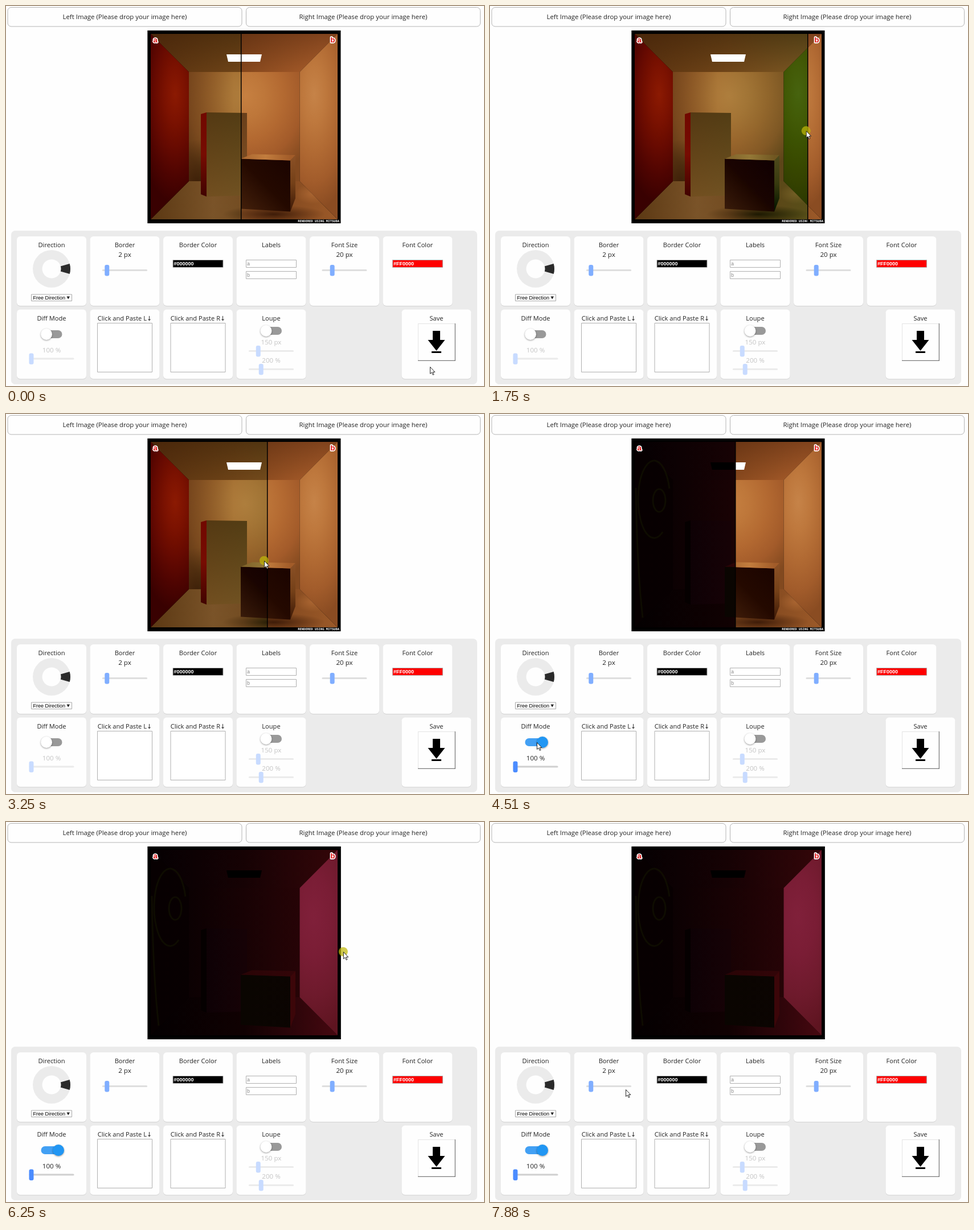
An HTML page with a canvas for the animation above (8000 ms loop, 839x668 px).

```html
<!DOCTYPE html>
<html lang="en">
<head>
<meta charset="utf-8">
<title>Image comparison</title>
<style>
html, body { margin: 0; width: 100%; height: 100%; overflow: hidden; background: #fefefe; }
canvas { display: block; }
</style>
</head>
<body>
<canvas id="stage" width="839" height="668"></canvas>
<script>
const W = 839, H = 668, LOOP = 8000, STEP = 125;
const VIEW = { x: 248.5, y: 43, s: 339 };
const UI = '"Open Sans", "Noto Sans", "DejaVu Sans", sans-serif';
const FORM = '"Liberation Sans", Arial, sans-serif';
const stage = document.getElementById('stage').getContext('2d');

function layer(paint) {
  const c = document.createElement('canvas');
  c.width = W;
  c.height = H;
  paint(c.getContext('2d'));
  return c;
}

function trace(g, points) {
  g.beginPath();
  for (const [x, y] of points) g.lineTo(x, y);
  g.closePath();
}

function poly(g, points, fill) {
  trace(g, points);
  g.fillStyle = fill;
  g.fill();
}

function stops(grad, colors) {
  colors.forEach((c, i) => grad.addColorStop(i / (colors.length - 1), c));
  return grad;
}

// Gradient running along a line between two points
const blend = (g, [x0, y0], [x1, y1], ...colors) =>
  stops(g.createLinearGradient(x0, y0, x1, y1), colors);

// Elliptical light, clipped to a wall
function glow(g, points, [x, y], rx, ry, ...colors) {
  g.save();
  trace(g, points);
  g.clip();
  g.translate(x, y);
  g.scale(rx, ry);
  g.fillStyle = stops(g.createRadialGradient(0, 0, 0, 0, 0, 1), colors);
  g.fillRect(-9, -9, 18, 18);
  g.restore();
}

function round(g, x, y, w, h, r, fill, stroke) {
  g.beginPath();
  g.roundRect(x, y, w, h, r);
  if (fill) { g.fillStyle = fill; g.fill(); }
  if (stroke) { g.strokeStyle = stroke; g.lineWidth = 1; g.stroke(); }
}

function disc(g, x, y, r, fill) {
  g.beginPath();
  g.arc(x, y, r, 0, Math.PI * 2);
  g.fillStyle = fill;
  g.fill();
}

function text(g, str, x, y, size = 11.1, color = '#222', align = 'center', font = UI, weight = '') {
  g.font = `${weight} ${size}px ${font}`;
  g.textAlign = align;
  g.fillStyle = color;
  g.fillText(str, x, y);
}

// Room: four walls join the open front to the back wall
const corners = (l, t, r, b) => [[l, t], [r, t], [r, b], [l, b]];
const FRONT = corners(254, 49, 582, 375);
const BACK = corners(321, 116, 515.5, 308);
const [CEILING, RIGHT, FLOOR, LEFT] = FRONT.map((p, i) => {
  const j = (i + 1) % 4;
  return [p, FRONT[j], BACK[j], BACK[i]];
});
const LIGHT = [[387, 85], [449, 85], [446, 98], [390, 98]];
const drop = (a, b, ha, hb) => [a, b, [b[0], b[1] + hb], [a[0], a[1] + ha]];
const TALL = drop([352, 187], [423, 188], 148, 145);
const TALL_SIDE = drop([342, 190], [352, 187], 141, 148);
const CUBE = drop([412, 268.5], [499, 271.5], 88, 90);
const CUBE_SIDE = drop([499, 271.5], [508, 262], 90, 76);
const CUBE_TOP = [CUBE[0], [432, 260.5], CUBE_SIDE[1], CUBE[1]];

function backdrop(g) {
  g.fillStyle = '#000';
  g.fillRect(VIEW.x, VIEW.y, VIEW.s, VIEW.s);
}

const render = layer(g => {
  backdrop(g);
  poly(g, CEILING, blend(g, FRONT[0], [540, 116], '#5a2f10', '#7e431a', '#a45a29'));
  poly(g, CEILING, blend(g, FRONT[0], [254, 116], 'rgba(60,24,6,.35)', 'rgba(60,24,6,0)'));
  poly(g, FLOOR, blend(g, FRONT[3], FRONT[2], '#5f3814', '#86542a', '#80471e', '#9c5a29'));
  glow(g, BACK, [420, 158], 135, 155, '#c68041', '#be773a', '#b36931', '#a35b2a', '#82491f');
  poly(g, BACK, blend(g, BACK[0], [400, 116], 'rgba(80,40,14,.4)', 'rgba(80,40,14,0)'));
  glow(g, BACK, [335, 310], 55, 75, 'rgba(62,24,6,.75)', 'rgba(62,24,6,0)');
  glow(g, LEFT, [297, 155], 72, 190, '#931a03', '#831202', '#6e0a00', '#560400', '#400100');
  glow(g, RIGHT, [541, 155], 80, 205, '#c68348', '#be783d', '#b16a33', '#a25c2b', '#8a4c22');
  glow(g, FLOOR, [470, 366], 90, 16, 'rgba(45,17,3,.8)', 'rgba(60,25,5,0)');
  glow(g, FLOOR, [538, 330], 30, 18, 'rgba(195,120,62,.5)', 'rgba(195,120,62,0)');
  poly(g, LIGHT, '#fff');
  poly(g, TALL_SIDE, blend(g, TALL_SIDE[0], TALL_SIDE[3], '#760800', '#7c0c02', '#480300'));
  poly(g, TALL, blend(g, TALL[0], TALL[2], '#623a18', '#74471f', '#865428'));
  poly(g, CUBE, blend(g, CUBE[1], CUBE[3], '#1b0400', '#240900', '#43200b'));
  poly(g, CUBE_TOP, blend(g, CUBE[0], CUBE[1], '#a8652f', '#c27d3e', '#a25c29'));
  poly(g, CUBE_SIDE, blend(g, CUBE_SIDE[1], CUBE_SIDE[3], '#8c5126', '#744018', '#3c1806'));
  text(g, 'RENDERED USING MITSUBA', 585, 379.5, 5.5, '#fff', 'right', '"DejaVu Sans Mono", monospace', 'bold');
});

const diff = layer(g => {
  const fade = (wall, ...colors) => poly(g, wall, blend(g, FRONT[0], FRONT[1], ...colors));
  backdrop(g);
  fade(CEILING, '#050002', '#160204', '#340609');
  fade(FLOOR, '#040001', '#100102', '#460810');
  fade(BACK, '#030001', '#180204', '#300508');
  fade(LEFT, '#070001', '#0a0001');
  glow(g, RIGHT, [540, 165], 95, 210, '#80203a', '#7a1d35', '#6e1a2c', '#5e1420');
  poly(g, LIGHT, '#000');
  poly(g, TALL_SIDE, '#050000');
  fade(TALL, '#020004', '#160206', '#180205');
  fade(CUBE, '#060401', '#0a0501', '#0c0402');
  fade(CUBE_TOP, '#100102', '#2a0406', '#3a060a');
  poly(g, CUBE_SIDE, '#3c0609');
});

// The left picture is the render minus the difference
const left = layer(g => {
  g.drawImage(render, 0, 0);
  g.globalCompositeOperation = 'difference';
  g.drawImage(diff, 0, 0);
});

// Faint contour lines show only in the difference
const contours = layer(g => {
  g.drawImage(diff, 0, 0);
  g.lineWidth = 3;
  g.strokeStyle = 'rgba(32,42,0,.3)';
  g.beginPath();
  g.ellipse(288, 150, 28, 68, 0, 1, 6);
  g.moveTo(256, 130);
  g.quadraticCurveTo(258, 270, 268, 358);
  g.moveTo(308, 152);
  g.ellipse(297, 152, 11, 20, 0, 0, 7);
  g.stroke();
});

function slider(g, cx, y, part, on, soft) {
  round(g, cx - 39.5, y - 1.5, 79, 3, 1.5, on ? (soft ? '#dedede' : '#cfcfcf') : '#ebebeb');
  round(g, cx - 39.5 + part * 71, y - 9.5, 8, 19.5, 3, on ? (soft ? '#80aeff' : '#4b8cff') : '#c8dbff');
}

function toggle(g, cx, y, on) {
  round(g, cx - 18.5, y - 7, 37, 14, 7, on ? '#42a0f4' : '#999');
  g.save();
  g.shadowColor = 'rgba(0,0,0,.4)';
  g.shadowBlur = 3;
  g.shadowOffsetY = 1;
  disc(g, on ? cx + 12 : cx - 9, y, 10, on ? '#2196f3' : '#fff');
  g.restore();
}

function field(g, cx, y, str, fill = '#fff', color = '#8a8a8a', weight = '') {
  round(g, cx - 44, y, 88, 13, 0, fill, '#b0b0b0');
  text(g, str, cx - 42.5, y + 9.5, 9, color, 'left', FORM, weight);
}

function wheel(g, cx) {
  disc(g, cx, 462, 33, '#ebebeb');
  g.beginPath();
  g.arc(cx, 462, 33, -.28, .28);
  g.lineTo(cx, 462);
  g.fillStyle = '#2a2a2a';
  g.fill();
  disc(g, cx, 462, 16.5, '#fefefe');
  round(g, cx - 35.5, 507, 71, 11.5, 0, '#fff', '#a9a9a9');
  text(g, 'Free Direction', cx - 32.5, 516, 9, '#000', 'left', FORM);
  poly(g, [[cx + 26.5, 510.5], [cx + 32, 510.5], [cx + 29.2, 515.5]], '#222');
}

function level(g, cx, y, str, part, on, soft) {
  text(g, str, cx, y, 11.6, on ? '#222' : '#c4c4c4');
  slider(g, cx, y + (on && soft ? 24 : 11.5), part, on, soft);
}

const paste = (g, cx) => round(g, cx - 48, 557.5, 96, 86, 0, '#fff', '#b0b0b0');

function save(g, cx) {
  ['#7c7c7c', '#e4e4e4', '#fefefe'].forEach((c, i) => {
    g.fillStyle = c;
    g.fillRect(cx - 32.5 + (i > 1), 558 + (i > 1), 66 - i * 1.3, 66 - i * 1.3);
  });
  g.fillStyle = '#000';
  g.fillRect(cx - 6.5, 571, 13, 17);
  poly(g, [[cx - 15, 587], [cx + 15, 587], [cx, 606]], '#000');
  g.fillRect(cx - 8.5, 607, 17, 3);
}

const center = col => 80 + col * 128.5;

const ROWS = [
  {
    'Direction': wheel,
    'Border': (g, cx) => level(g, cx, 440.5, '2 px', .06, true, true),
    'Border Color': (g, cx) => field(g, cx, 446.5, '#000000', '#000', '#fff', 'bold'),
    'Labels': (g, cx) => ['a', 'b'].forEach((s, i) => field(g, cx, 446.5 + i * 20, s)),
    'Font Size': (g, cx) => level(g, cx, 440.5, '20 px', .2, true, true),
    'Font Color': (g, cx) => field(g, cx, 446.5, '#FF0000', '#f00', '#fff', 'bold')
  },
  {
    'Diff Mode': () => {},
    'Click and Paste L↓': paste,
    'Click and Paste R↓': paste,
    'Loupe': (g, cx) => {
      toggle(g, cx, 571, false);
      level(g, cx, 595, '150 px', .18, false);
      level(g, cx, 627, '200 %', .25, false);
    }
  }
];

function card(g, title, cx, row, paint) {
  const y = 405 + row * 128.5;
  round(g, cx - 61, y + 1, 122, 122, 6, '#d2d2d2');
  round(g, cx - 61, y, 122, 122, 6, '#fefefe');
  text(g, title, cx, y + 19);
  paint(g, cx);
}

const page = layer(g => {
  g.fillStyle = '#fefefe';
  g.fillRect(0, 0, W, H);
  ['Left', 'Right'].forEach((side, i) => {
    round(g, 3 + i * 418.5, 2.5, 411, 33.5, 6, '#fefefe', '#b4b4b4');
    text(g, `${side} Image (Please drop your image here)`, 208.5 + i * 418.5, 22.5, 11.4);
  });
  round(g, 9, 395, 818, 270, 7, '#ebebeb');
  ROWS.forEach((row, r) =>
    Object.entries(row).forEach(([title, paint], col) => card(g, title, center(col), r, paint)));
  card(g, 'Save', 755.5, 1, save);
});

// Turning points of the pointer: step, x, y
const PATH = [
  [0, 744, 634], [3, 631, 591], [7, 412, 205], [8.4, 325, 200], [12.6, 585, 215],
  [19, 338, 250], [23.5, 665, 255], [26.6, 430, 258], [28, 430, 258], [34, 80, 588],
  [36, 82, 577], [42, 504, 212], [45, 380, 218], [47.5, 640, 228], [51, 580, 228],
  [55.5, 297, 232], [59.7, 655, 258], [63, 238, 470]
];
const DRAGS = [[7, 28], [40, 60]];
const DIFF_ON = 35;
const LAG = .07;

const ease = f => f * f * (3 - 2 * f);

function pointer(n) {
  const i = Math.max(1, PATH.findIndex(k => k[0] >= n));
  const [n0, x0, y0] = PATH[i - 1], [n1, x1, y1] = PATH[i];
  const f = ease((n - n0) / (n1 - n0));
  return { x: x0 + (x1 - x0) * f, y: y0 + (y1 - y0) * f };
}

// The divider trails the pointer and stays where it is let go
function divider(n) {
  let x = 412;
  for (const [a, b] of DRAGS) if (n >= a) x = pointer(Math.min(n, b) - LAG).x;
  return Math.round(Math.min(VIEW.x + VIEW.s, Math.max(VIEW.x, x)));
}

function tag(g, str, x) {
  g.lineJoin = 'round';
  g.lineWidth = 3.5;
  g.strokeStyle = '#fff';
  g.font = `bold 13px ${FORM}`;
  g.textAlign = 'center';
  g.strokeText(str, x, 64);
  g.fillStyle = '#e01010';
  g.fillText(str, x, 64);
}

function arrow(g, { x, y }, pressed) {
  if (pressed) disc(g, x, y, 8, 'rgba(191,183,8,.72)');
  g.save();
  g.translate(x + .5, y + .5);
  poly(g, [[0, 0], [0, 12], [2.8, 9.6], [4.8, 14], [6.6, 13.2], [4.7, 9], [8.4, 9]], '#fff');
  g.strokeStyle = '#111';
  g.lineWidth = .9;
  g.stroke();
  g.restore();
}

function draw(n) {
  const g = stage, on = n >= DIFF_ON, split = divider(n), { x, y, s } = VIEW;
  const pressed = n === DIFF_ON || DRAGS.some(([a, b]) => n >= a && n < b);
  g.drawImage(page, 0, 0);
  toggle(g, center(0), 577, on);
  level(g, center(0), 608.5, '100 %', 0, on);

  g.drawImage(render, 0, 0);
  g.save();
  g.beginPath();
  g.rect(x, y, split - x, s);
  g.clip();
  g.drawImage(on ? contours : left, 0, 0);
  g.restore();
  g.fillStyle = '#000';
  g.fillRect(Math.min(split, x + s - 1.5), y, 1.5, s);
  tag(g, 'a', 262);
  tag(g, 'b', 573.5);
  arrow(g, pointer(n), pressed);
}

function tick() {
  const t = performance.now() % LOOP;
  draw(Math.min(LOOP / STEP - 1, Math.floor((t + 5) / STEP)));
  requestAnimationFrame(tick);
}
tick();
</script>
</body>
</html>
```
